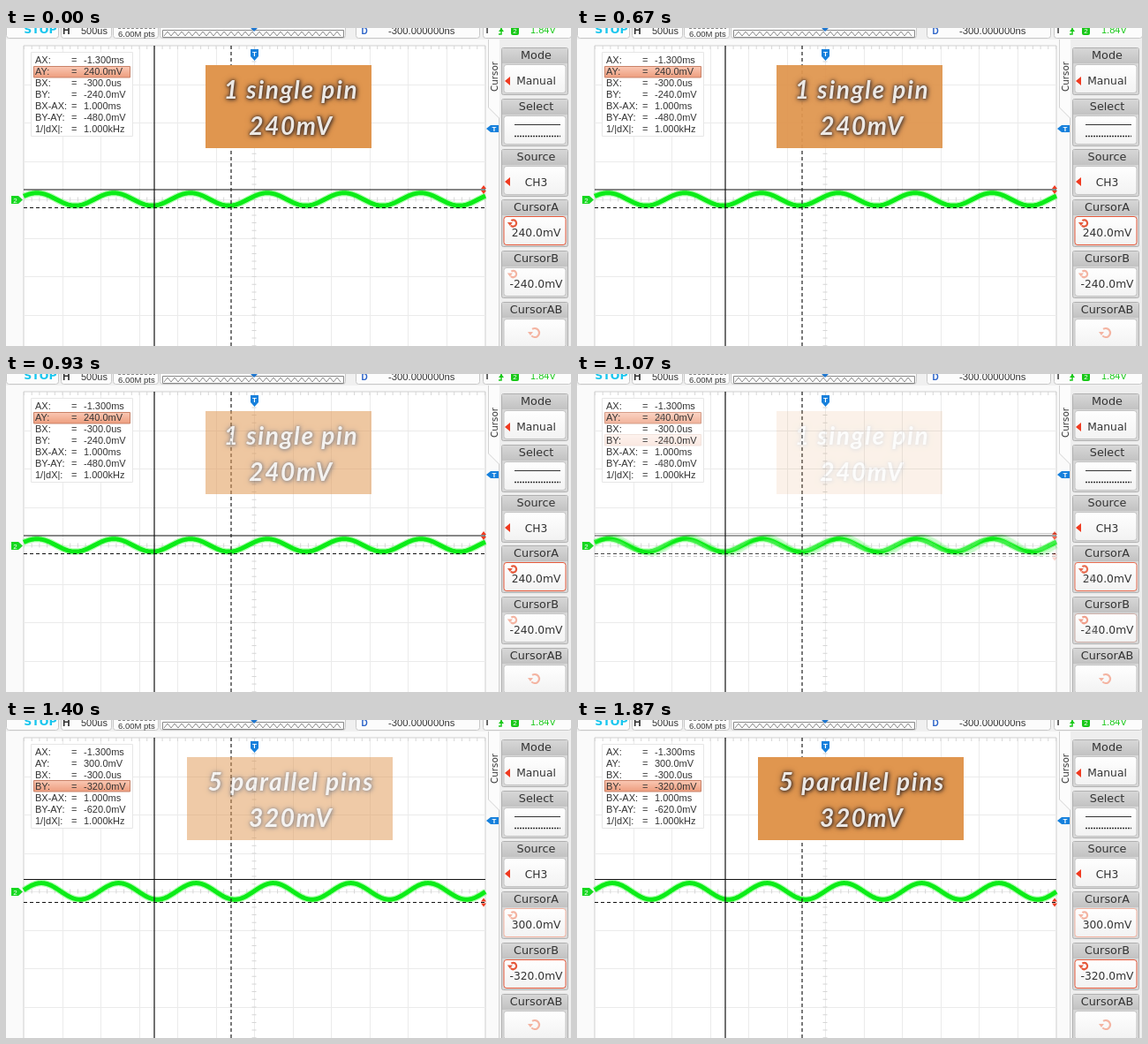
Animation of 640 by 360 pixels, one loop 1940 ms. Source, as an HTML page with a canvas:

```html
<!DOCTYPE html>
<html lang="en">
<head>
<meta charset="utf-8">
<title>Oscilloscope ripple comparison</title>
<style>
html, body { margin: 0; width: 100%; height: 100%; overflow: hidden; background: #fafafa; }
canvas, .label { position: absolute; left: 0; top: 0; }
.label {
  top: 41.5px; height: 94.5px; box-sizing: border-box; padding-top: 7.5px;
  background: #e0964f; color: #ece8e4; text-align: center; white-space: pre;
  font: italic bold 28px/41px Lato, sans-serif; letter-spacing: 1.6px;
  text-shadow: 0 0 3px #4a3428, 1px 1px 4px #4a3428, 0 0 7px #6b4a35;
}
#single { left: 226px; width: 188px; padding-left: 6px; }
#parallel { left: 205px; width: 232.5px; padding-left: 3px; }
</style>
</head>
<body>
<canvas id="before" width="640" height="360"></canvas>
<canvas id="after" width="640" height="360"></canvas>
<div class="label" id="single">1 single pin
240mV</div>
<div class="label" id="parallel">5 parallel pins
320mV</div>
<script>
const LOOP = 1940, FRAMES = 29;
const UI = '"DejaVu Sans", sans-serif', ARIAL = '"Liberation Sans", sans-serif';
const LEFT = 20, RIGHT = 543, TOP = 20, DIV = 43.5, MID_X = 281, MID_Y = 194;
const $ = id => document.getElementById(id);

function drawScope(canvas, s) {
  const c = canvas.getContext('2d');

  const box = (x, y, w, h, fill, stroke, r = 0, lw = 1) => {
    c.beginPath();
    c.roundRect(x, y, w, h, r);
    if (fill) { c.fillStyle = fill; c.fill(); }
    if (stroke) { c.strokeStyle = stroke; c.lineWidth = lw; c.stroke(); }
  };
  const line = (points, color, lw = 1, dash = []) => {
    c.beginPath();
    points.forEach(p => c.lineTo(...p));
    c.strokeStyle = color;
    c.lineWidth = lw;
    c.setLineDash(dash);
    c.stroke();
    c.setLineDash([]);
  };
  const shape = (points, color) => {
    c.beginPath();
    points.forEach(p => c.lineTo(...p));
    c.fillStyle = color;
    c.fill();
  };
  const text = (str, x, y, font, color = '#333', align = 'left') => {
    c.font = font;
    c.fillStyle = color;
    c.textAlign = align;
    c.fillText(str, x, y);
  };
  const shade = (y, h, from, to) => {
    const g = c.createLinearGradient(0, y, 0, y + h);
    g.addColorStop(0, from);
    g.addColorStop(1, to);
    return g;
  };

  function topBar() {
    box(0, 0, 640, 13, '#f0f0f0');
    for (const [x, w] of [[0, 59], [62, 57], [121, 51], [174, 210], [396, 140], [540, 100]])
      box(x + .5, -8.5, w, 20, '#fcfcfc', '#c8c8c8', 3);
    text('STOP', 39, 6, 'bold 12.5px ' + UI, '#19c6ee', 'center');
    text('H', 64, 7, 'bold 12px ' + ARIAL);
    text('500us', 85, 7, '11px ' + ARIAL);
    line([[127, .5], [169, .5]], '#888', 1, [3, 2]);
    text('6.00M pts', 127, 10, '9.5px ' + ARIAL);
    box(177.5, 2.5, 205, 8, '#fff', '#888');
    const zigzag = [];
    for (let i = 0; i < 51; i++) zigzag.push([179 + i * 4, i % 2 ? 4 : 9]);
    line(zigzag, '#888');
    shape([[277, 0], [285, 0], [281, 4]], '#1f77d0');
    text('D', 406, 7, 'bold 10px ' + ARIAL, '#2a62c8', 'center');
    text('-300.000000ns', 433, 7, '11.3px ' + ARIAL);
    text('T', 542, 6, 'bold 10px ' + ARIAL);
    line([[558, 7], [561, 7], [561, -2]], '#18c818', 1.5);
    shape([[558, 4], [564, 4], [561, 0]], '#18c818');
    box(572, -2, 9, 10, '#18c818', null, 2);
    text('2', 576.5, 6, '8px ' + ARIAL, '#fff', 'center');
    text('1.84V', 594, 6, '11px ' + ARIAL, '#18c818');
  }

  function grid() {
    box(LEFT, TOP, RIGHT - LEFT, 350, '#fff', '#cfcfcf');
    for (let i = 1; i < 12; i++) {
      const x = Math.round(LEFT + i * DIV) + .5;
      line([[x, TOP], [x, 360]], '#ebebeb');
    }
    for (let i = 1; i < 8; i++) {
      const y = Math.round(TOP + i * DIV) + .5;
      line([[LEFT, y], [RIGHT, y]], '#ebebeb');
    }
    const tick = DIV / 5;
    line([[MID_X, TOP], [MID_X, 360]], '#d6d6d6', 5, [1, tick - 1]);
    line([[LEFT, MID_Y], [RIGHT, MID_Y]], '#d6d6d6', 5, [1, tick - 1]);
    line([[LEFT, TOP + 2], [RIGHT, TOP + 2]], '#d6d6d6', 4, [1, tick - 1]);
  }

  function wave() {
    const points = [];
    for (let x = LEFT; x <= RIGHT; x++)
      points.push([x, s.mid - s.amp * Math.cos((x - s.peak) / s.period * 2 * Math.PI)]);
    line(points, 'rgba(70,255,70,.4)', 7.5);
    line(points, '#0cec18', 5);
  }

  // Cursor lines sit between pixels, which gives them their soft grey look.
  function cursors() {
    const dash = [4, 3];
    line([[168, TOP], [168, 360]], '#111', 1.2);
    line([[255, TOP], [255, 360]], '#222', 1.2, dash);
    line([[LEFT, s.ay], [RIGHT, s.ay]], '#111', 1.2);
    line([[LEFT, s.by], [RIGHT, s.by]], '#111', 1.2, dash);
    const y = s.active === 'A' ? s.ay : s.by;
    shape([[538, y - 1], [544, y - 1], [541, y - 5]], '#f03a20');
    shape([[538, y + 1], [544, y + 1], [541, y + 5]], '#f03a20');
  }

  function markers() {
    shape([[6, 190], [14, 190], [19, 194.5], [14, 199], [6, 199]], '#16d820');
    text('2', 10.5, 198, '8px ' + ARIAL, '#fff', 'center');
    shape([[277, 24], [286, 24], [286, 32], [281.5, 37], [277, 32]], '#1680dc');
    text('T', 281.5, 32, 'bold 8px ' + ARIAL, '#fff', 'center');
    shape([[544, 114], [549, 110], [558, 110], [558, 118], [549, 118]], '#1680dc');
    text('T', 553, 117, 'bold 8px ' + ARIAL, '#fff', 'center');
  }

  function readout() {
    box(28.5, 27.5, 115, 95, '#fff', '#e6e6e6');
    const y = s.active === 'A' ? 43.5 : 68.5;
    box(31.5, y, 109, 12.5, shade(y, 12, '#fac8b4', '#ee9f80'), '#c98268');
    const rows = [
      ['AX:', '-1.300ms'], ['AY:', s.a], ['BX:', '-300.0us'], ['BY:', s.b],
      ['BX-AX:', '1.000ms'], ['BY-AY:', s.delta], ['1/|dX|:', '1.000kHz']
    ];
    rows.forEach(([name, value], i) => {
      const base = 40 + i * 13;
      text(name, 33, base, '11px ' + ARIAL);
      text('=', 74, base, '11px ' + ARIAL);
      text(value, 88, base, '11px ' + ARIAL);
    });
  }

  function knob(x, y, r, color) {
    c.beginPath();
    c.arc(x, y, r, -2.2, 2.4);
    c.strokeStyle = color;
    c.lineWidth = 2.2;
    c.stroke();
    shape([[x - r - 3, y - 1], [x - r + 3, y - 1], [x - r, y + 3]], color);
  }

  function button(y, title, value, border = '#c4c4c4') {
    box(561.5, y + .5, 75, 53, '#d8d8d8', '#b0b0b0', 2);
    box(562, y + 1, 74, 17, shade(y, 18, '#d8d8d8', '#c2c2c2'));
    text(title, 600.5, y + 13, '12.8px ' + UI, '#333', 'center');
    box(564, y + 19.5, 70, 32, shade(y + 19, 33, '#fff', '#f2f2f2'), border, 3);
    if (value) text(value, 600.5, y + 42, '12.3px ' + UI, '#333', 'center');
  }

  function sidePanel() {
    box(558, 13, 82, 347, '#eeeeee');
    shape([[546, 13], [559, 13], [559, 102], [546, 90]], '#fcfcfc');
    line([[546.5, 13], [546.5, 90], [558.5, 102], [558.5, 360]], '#d2d2d2');
    c.save();
    c.translate(557, 55);
    c.rotate(-Math.PI / 2);
    text('Cursor', 0, 0, '10.3px ' + UI, '#333', 'center');
    c.restore();

    const red = '#e65a3c', pale = '#f4b4a2';
    const a = s.active === 'A';
    button(22, 'Mode', 'Manual');
    button(80, 'Select');
    button(137, 'Source', 'CH3');
    button(194, 'CursorA', s.a, a ? red : pale);
    button(252, 'CursorB', s.b, a ? '#c4c4c4' : red);
    button(310, 'CursorAB');
    for (const y of [60, 174])
      shape([[565, y], [571, y - 5], [571, y + 5]], '#f03a20');
    line([[576, 109.5], [628, 109.5]], '#333');
    line([[576, 122.5], [628, 122.5]], '#333', 1.3, [2, 1]);
    knob(574.5, 221, 3.6, a ? red : pale);
    knob(574.5, 278.5, 3.6, a ? pale : red);
    knob(599, 345, 5, pale);
  }

  box(0, 0, 640, 360, '#fafafa');
  topBar();
  grid();
  wave();
  cursors();
  readout();
  sidePanel();
  markers();
}

drawScope($('before'), {
  active: 'A', a: '240.0mV', b: '-240.0mV', delta: '-480.0mV',
  ay: 183, by: 203.5, mid: 193.9, amp: 7.2, peak: 35, period: 87
});
drawScope($('after'), {
  active: 'B', a: '300.0mV', b: '-320.0mV', delta: '-620.0mV',
  ay: 180.5, by: 206.5, mid: 193.9, amp: 9.3, peak: 40, period: 87.6
});

const ramp = (t, from, to) => Math.min(1, Math.max(0, (t - from) / (to - from)));
const start = performance.now();

function render() {
  const elapsed = (performance.now() - start) % LOOP;
  const step = LOOP / FRAMES;
  // The clip advances at 15 frames per second.
  const t = Math.floor((elapsed + 5) / step) % FRAMES * step;
  $('single').style.opacity = 1 - ramp(t, 640, 1130);
  $('after').style.opacity = ramp(t, 980, 1390);
  $('parallel').style.opacity = ramp(t, 1140, 1670);
  requestAnimationFrame(render);
}
render();
</script>
</body>
</html>
```
